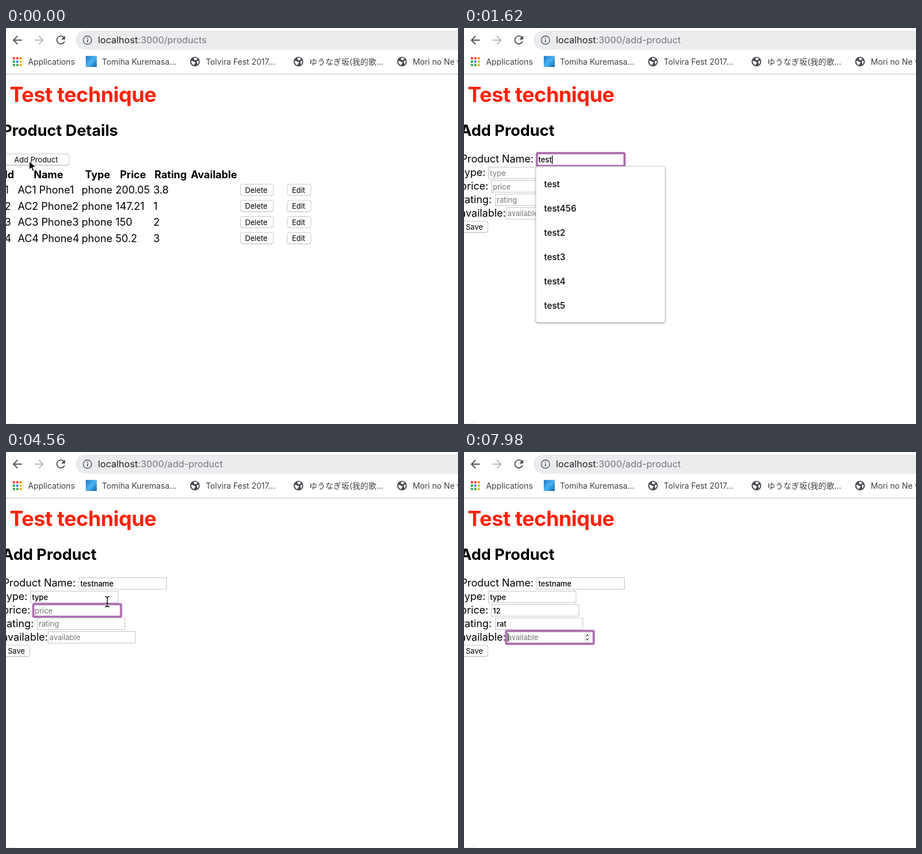
These frames come from a looping animation (799x701 px, 8000 ms). An HTML page:

```html
<!DOCTYPE html>
<html lang="en">
<head>
<meta charset="utf-8">
<title>Add product</title>
<style>
  html, body { margin: 0; width: 100%; height: 100%; overflow: hidden; background: #fff; }
  svg { display: block; width: 799px; height: 701px; }
  text { font: 18.25px Inter, sans-serif; font-optical-sizing: none; white-space: pre; }
  .h1 { font-size: 36.7px; font-weight: 700; letter-spacing: -.5px; fill: #fb230b; }
  .h2 { font-size: 27.6px; font-weight: 700; letter-spacing: -.05px; }
  .th { font-weight: 700; text-anchor: middle; }
  .end { text-anchor: end; }
  .ui { font-size: 13.1px; }
  .value { font-size: 13.2px; font-weight: 500; }
  .hint { font-size: 13.1px; fill: #757575; }
  .mark { font: 14.2px Inter, 'Noto Sans CJK JP', 'Noto Sans CJK', sans-serif; fill: #3c4043; }
  .url { font-size: 16.55px; fill: #202124; }
  .item { font-size: 15.3px; font-weight: 600; fill: #202124; }
  .line { fill: none; stroke-width: 1.9; }
</style>
</head>
<body>
<svg viewBox="0 0 799 701">
  <defs>
    <filter id="shadow" x="-10%" y="-10%" width="120%" height="120%">
      <feDropShadow dx="0" dy="1.2" stdDeviation="1.8" flood-opacity=".4"/>
    </filter>
    <linearGradient id="sky" x2="1" y2="1">
      <stop stop-color="#1c6fc4"/><stop offset=".5" stop-color="#49b4ee"/><stop offset="1" stop-color="#1763b0"/>
    </linearGradient>
  </defs>
  <g id="chrome"></g>
  <g id="page"></g>
</svg>
<script>
const LOOP = 8000, STEP = 60, PAGE_SWITCH = 300;
const chrome = document.getElementById('chrome');
const page = document.getElementById('page');
const ruler = document.createElement('canvas').getContext('2d');
ruler.font = '500 13.2px Inter, sans-serif';

const text = (x, y, s, cls = '') => `<text x="${x}" y="${y}" class="${cls}">${s}</text>`;
const rect = (x, y, w, h, attrs) => `<rect x="${x}" y="${y}" width="${w}" height="${h}" ${attrs}/>`;
const at = (x, y, s) => `<g transform="translate(${x} ${y})">${s}</g>`;

const button = (x, y, w, label, tx) =>
  rect(x, y + .6, w, 20, 'rx="4" fill="#a9a9a9"') +
  rect(x, y, w, 20, 'rx="4" fill="#fff" stroke="#c6c6c6"') +
  text(tx, y + 15.3, label, 'ui');

// Browser frame
const globe = '<circle r="8.6" fill="#494c50"/>' +
  '<path fill="#fff" d="M-6.6 -1.2Q-3 -1.6 -1.4 .6L1 1.2Q1 3.6 -1.2 4L-1.4 6.6Q-6.4 5 -6.6 -1.2Z' +
  'M-1.6 -6.4Q2 -7.4 4.4 -5L2.6 -3 -.4 -2.4 -1.8 -4Z M3.2 -.6Q5.2 -2 6.7 -1Q6.9 3 3.8 5.4L4 2.4Z"/>';

const grid = ['#ea4335', '#e8453c', '#f08a2c', '#34a853', '#4285f4', '#fbbc05', '#34a853', '#3da757', '#f5b51e']
  .map((c, i) => rect(12 + i % 3 * 6, 51.5 + Math.floor(i / 3) * 6, 4, 4, `fill="${c}"`)).join('');

chrome.innerHTML =
  '<path class="line" stroke="#4a4d51" d="M28 21.5H13.5M20.5 14.2L13.2 21.5 20.5 28.8"/>' +
  '<path class="line" stroke="#b4b6b9" d="M50.5 21.5H65M58 14.2L65.3 21.5 58 28.8"/>' +
  '<path class="line" stroke="#4a4d51" d="M102.2 16.6A7 7 0 1 0 103.5 23.5"/>' +
  '<path fill="#4a4d51" d="M104.5 13.5V20.5H97.5Z"/>' +
  rect(123, 4.5, 720, 34, 'rx="17" fill="#ebecee"') +
  '<circle cx="144" cy="21.5" r="7.4" class="line" style="stroke-width:1.6" stroke="#5f6368"/>' +
  rect(143.1, 20.5, 1.8, 5.2, 'fill="#5f6368"') + rect(143.1, 17.2, 1.8, 1.9, 'fill="#5f6368"') +
  grid + text(39, 64.5, 'Applications', 'mark') +
  rect(141, 49.5, 19.5, 19.5, 'fill="url(#sky)"') + text(169.5, 64.5, 'Tomiha Kuremasa...', 'mark') +
  [[334, 'Tolvira Fest 2017...'], [517, 'ゆうなぎ坂(我的歌...'], [700, 'Mori no Ne wa']]
    .map(([x, s]) => at(x, 59.5, globe) + text(x + 19, 64.5, s, 'mark')).join('') +
  rect(0, 81, 799, 1.2, 'fill="#c9c9c9"') +
  rect(0, 699.8, 20, 1.2, 'fill="#ededed"') +
  text(6.5, 131, 'Test technique', 'h1');

// Product list
const products = [['200.05', '3.8'], ['147.21', '1'], ['150', '2'], ['50.2', '3']];

const listPage = () =>
  text(198, 190.5, 'Product Details', 'h2 end') +
  button(-12, 222.8, 124, 'Add Product', 14.5) +
  [['Id', 6], ['Name', 75], ['Type', 162], ['Price', 224.5], ['Rating', 291], ['Available', 367.5]]
    .map(([s, x]) => text(x, 265.5, s, 'th')).join('') +
  products.map(([price, rating], i) => {
    const n = i + 1, y = 293 + i * 28.5;
    return text(-2.5, y, n) + text(20.7, y, `AC${n} Phone${n}`) +
      text(133.8, y, 'phone') + text(193.5, y, price) + text(260.5, y, rating) +
      button(414.5, y - 16.5, 58, 'Delete', 422.5) + button(497.5, y - 16.5, 41.5, 'Edit', 505.5);
  }).join('');

// Form: each field gains focus at `focus` and receives its letters at `keys`
const fields = [
  { label: 'Product Name:', end: 123, x: 129, hint: 'product name', value: 'testname', focus: 1080,
    keys: [1200, 1320, 1440, 1560, 2040, 2160, 2280, 2400],
    menu: { from: 1200, to: 2040, items: ['test', 'test456', 'test2', 'test3', 'test4', 'test5'] } },
  { label: 'type:', end: 38, x: 43.5, hint: 'type', value: 'type', focus: 2580,
    keys: [3060, 3180, 3300, 3420] },
  { label: 'price:', end: 43, x: 48.5, hint: 'price', value: '12', focus: 3780,
    keys: [4860, 5040], menu: { from: 4860, to: 5340, items: ['12', '150'] } },
  { label: 'rating:', end: 49, x: 55.5, hint: 'rating', value: 'rat', focus: 5460,
    keys: [6300, 6480, 6600] },
  { label: 'available:', end: 74, x: 74.5, hint: 'available', value: '', focus: 6900, keys: [], spinner: true }
];

const menuBox = (x, y, items) =>
  rect(x, y, 228.5, items.length * 43 + 18, 'rx="4" fill="#fff" stroke="#c4c4c4" stroke-width=".8" filter="url(#shadow)"') +
  items.map((s, i) => text(x + 14.4, y + 37 + i * 43, s, 'item')).join('');

const spinner = (x, y) =>
  rect(x, y, 9, 15.5, 'rx="4" fill="#fff" stroke="#bbb" stroke-width=".8"') +
  `<path fill="none" stroke="#333" stroke-width="1.2" d="M${x + 2.2} ${y + 5.8}l2.3-2.6 2.3 2.6m-4.6 4l2.3 2.6 2.3-2.6"/>`;

const focusRing = (x, y) =>
  rect(x - .2, y - .9, 155, 22.6, 'rx="2" fill="#fff" stroke="#b57fb9" stroke-width="5" stroke-opacity=".5"') +
  rect(x - .2, y - .9, 155, 22.6, 'rx="1.5" fill="none" stroke="#a968ab" stroke-width="3"');

function field(f, i, t) {
  const y = 222.5 + i * 23.8;
  const next = fields[i + 1];
  const focused = t >= f.focus && (!next || t < next.focus);
  const typed = f.keys.filter(k => k <= t);
  const value = f.value.slice(0, typed.length);
  let out = text(f.end, y + 15.8, f.label, 'end');
  out += focused ? focusRing(f.x, y) : rect(f.x, y, 154.5, 20.5, 'fill="#fff" stroke="#c2c2c2"');
  out += text(f.x + 2.5, y + 15.5, value || f.hint, value ? 'value' : 'hint');
  if (focused) {
    const last = typed.length ? typed[typed.length - 1] : f.focus;
    if ((t - last) % 1000 < 500)
      out += rect(f.x + 2.8 + ruler.measureText(value).width, y + 2.8, 1.3, 15.5, 'fill="#000"');
    if (f.spinner) out += spinner(f.x + 139, y + 2.6);
  }
  return out;
}

const formPage = t =>
  text(160, 190.5, 'Add Product', 'h2 end') +
  button(-12, 342, 54, 'Save', 3.2) +
  fields.map((f, i) => field(f, i, t)).join('') +
  fields.map((f, i) => f.menu && t >= f.menu.from && t < f.menu.to
    ? menuBox(f.x - 2, 245 + i * 23.8, f.menu.items) : '').join('');

// Pointer: [time, x, y] stops, hidden while typing
const trips = [
  [[0, 41, 235], [240, 41, 235], [540, 51, 232], [960, 180, 234], [1200, 180, 234]],
  [[4320, 180, 234], [4560, 179, 265], [4860, 179, 266]]
];
const arrow = '<path fill="#000" stroke="#fff" stroke-width="1.2" d="M0 0V16.3L3.7 12.8 6.2 18.7 9 17.5 6.5 11.7H11.7Z"/>';
const beamPath = 'M-4 -9Q-.5 -9 0 -7Q.5 -9 4 -9M0 -7V7M-4 9Q-.5 9 0 7Q.5 9 4 9M-2.2 3H2.2';
const beam = `<path fill="none" stroke="#fff" stroke-width="3" d="${beamPath}"/>` +
  `<path fill="none" stroke="#000" stroke-width="1.4" d="${beamPath}"/>`;

function pointer(t) {
  const trip = trips.find(p => t >= p[0][0] && t < p[p.length - 1][0]);
  if (!trip) return '';
  const i = trip.findIndex(p => p[0] > t);
  const [t0, x0, y0] = trip[i - 1], [t1, x1, y1] = trip[i];
  const u = (t - t0) / (t1 - t0), e = u * u * (3 - 2 * u);
  const x = x0 + (x1 - x0) * e, y = y0 + (y1 - y0) * e;
  return at(x, y, x > 129 ? beam : arrow);
}

function draw(t) {
  const listed = t < PAGE_SWITCH;
  page.innerHTML =
    text(162.5, 27.3, `localhost<tspan fill="#74777b">:3000/${listed ? 'products' : 'add-product'}</tspan>`, 'url') +
    (listed ? listPage() : formPage(t)) + pointer(t);
}

const start = performance.now();
let shown = -1;
function tick() {
  const t = Math.floor((performance.now() - start) % LOOP / STEP) * STEP;
  if (t !== shown) draw(shown = t);
  requestAnimationFrame(tick);
}
tick();
</script>
</body>
</html>
```
